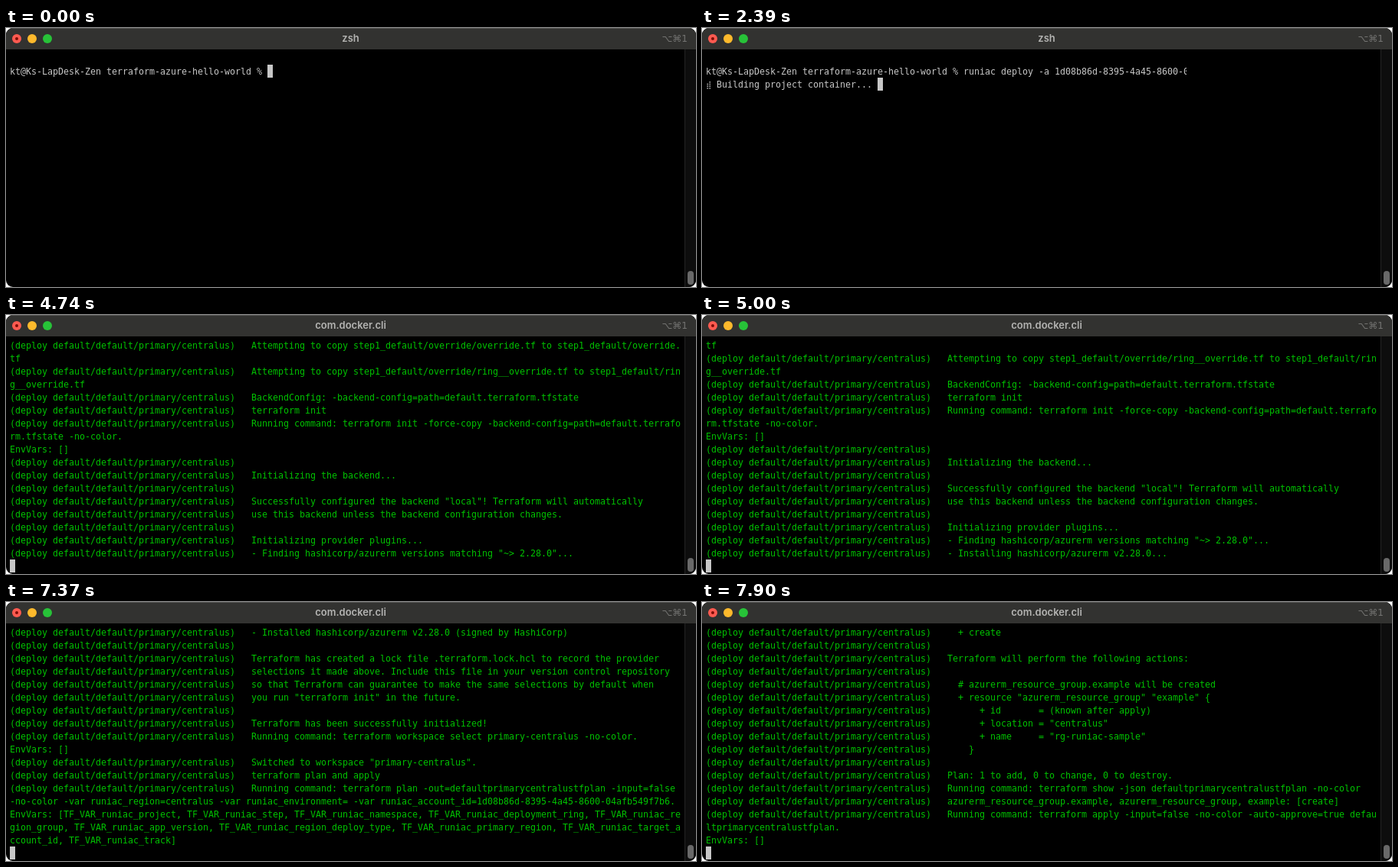
Write an HTML page with a canvas that moves like this. It is 900x339 px and loops after 8 s.

```html
<!DOCTYPE html>
<html lang="en">
<head>
<meta charset="utf-8">
<title>Terminal</title>
<style>
  html, body { margin: 0; width: 100%; height: 100%; overflow: hidden; background: #fff; }
  canvas { display: block; }
</style>
</head>
<body>
<canvas id="stage" width="900" height="339"></canvas>
<script>
const ctx = document.getElementById('stage').getContext('2d');
const LOOP = 8000;
const CELL_W = 7, CELL_H = 17, LEFT = 5, TOP = 31, COLS = 125, ROWS = 17;
const GREY = '#c7c7c7', GREEN = '#00c200';

const ACCOUNT = '1d08b86d-8395-4a45-8600-04afb549f7b6';
const PROMPT = 'kt@Ks-LapDesk-Zen terraform-azure-hello-world % ';
const COMMAND = 'runiac deploy -a ' + ACCOUNT;
const STATUS = '  Building project container... ';

// Lines starting with ">" get the deploy prefix.
const PREFIX = '(deploy default/default/primary/centralus)   ';
const LOG = `>Attempting to copy step1_default/override/override.tf to step1_default/override.tf
>Attempting to copy step1_default/override/ring__override.tf to step1_default/ring__override.tf
>BackendConfig: -backend-config=path=default.terraform.tfstate
>terraform init
>Running command: terraform init -force-copy -backend-config=path=default.terraform.tfstate -no-color.
EnvVars: []
>
>Initializing the backend...
>
>Successfully configured the backend "local"! Terraform will automatically
>use this backend unless the backend configuration changes.
>
>Initializing provider plugins...
>- Finding hashicorp/azurerm versions matching "~> 2.28.0"...
>- Installing hashicorp/azurerm v2.28.0...
>- Installed hashicorp/azurerm v2.28.0 (signed by HashiCorp)
>
>Terraform has created a lock file .terraform.lock.hcl to record the provider
>selections it made above. Include this file in your version control repository
>so that Terraform can guarantee to make the same selections by default when
>you run "terraform init" in the future.
>
>Terraform has been successfully initialized!
>Running command: terraform workspace select primary-centralus -no-color.
EnvVars: []
>Switched to workspace "primary-centralus".
>terraform plan and apply
>Running command: terraform plan -out=defaultprimarycentralustfplan -input=false -no-color -var runiac_region=centralus -var runiac_environment= -var runiac_account_id=${ACCOUNT}.
EnvVars: [TF_VAR_runiac_project, TF_VAR_runiac_step, TF_VAR_runiac_namespace, TF_VAR_runiac_deployment_ring, TF_VAR_runiac_region_group, TF_VAR_runiac_app_version, TF_VAR_runiac_region_deploy_type, TF_VAR_runiac_primary_region, TF_VAR_runiac_target_account_id, TF_VAR_runiac_track]
>
>An execution plan has been generated and is shown below.
>Resource actions are indicated with the following symbols:
>
>  + create
>
>Terraform will perform the following actions:
>
>  # azurerm_resource_group.example will be created
>  + resource "azurerm_resource_group" "example" {
>      + id       = (known after apply)
>      + location = "centralus"
>      + name     = "rg-runiac-sample"
>    }
>
>Plan: 1 to add, 0 to change, 0 to destroy.
>Running command: terraform show -json defaultprimarycentralustfplan -no-color
>azurerm_resource_group.example, azurerm_resource_group, example: [create]
>Running command: terraform apply -input=false -no-color -auto-approve=true defaultprimarycentralustfplan.
EnvVars: []`;

const rows = LOG.split('\n').flatMap(line =>
  line.replace(/^>/, PREFIX).match(new RegExp(`.{1,${COLS}}`, 'g')));

// [start time, value] steps: characters typed, spinner redraws, top log row
const TYPING = [[0, 0], [250, 2], [510, 4], [780, 7], [1050, 11], [1320, 13],
                [1590, 15], [1850, 17], [2120, COMMAND.length]];
const SPINNER = [2390, 2660, 2920, 3180, 3430, 3690, 3960, 4220, 4480].map(t => [t, t]);
const SCROLL = [[4740, 0], [5000, 1], [5260, 18], [7630, 35], [7900, 39]];
const BUILD_START = 2390, DOCKER_START = 2920, LOG_START = 4740;

const valueAt = (steps, t) => steps.filter(([start]) => start <= t).pop()[1];

function rect(x, y, w, h, color) {
  ctx.fillStyle = color;
  ctx.fillRect(x, y, w, h);
}

function pill(x, y, w, h, r, color) {
  ctx.fillStyle = color;
  ctx.beginPath();
  ctx.roundRect(x, y, w, h, r);
  ctx.fill();
}

const dot = (x, y, r, color) => pill(x - r, y - r, 2 * r, 2 * r, r, color);

function write(text, row, color) {
  ctx.font = '11.63px "DejaVu Sans Mono", monospace';
  ctx.textAlign = 'left';
  ctx.fillStyle = color;
  [...text].forEach((ch, col) => {
    if (ch !== ' ') ctx.fillText(ch, LEFT + col * CELL_W, TOP + row * CELL_H + 13);
  });
}

const cursor = (col, row) =>
  rect(LEFT + col * CELL_W, TOP + row * CELL_H, CELL_W, CELL_H, GREY);

// Braille cell with one gap travelling down the left side and up the right.
function spinner(phase) {
  for (let i = 0; i < 8; i++) {
    if (i === phase) continue;
    const right = i > 3;
    rect(right ? 9.5 : 6.5, 70 + 2.7 * (right ? 7 - i : i), 1.6, 1.6, '#b0b0b0');
  }
}

function drawWindow(t) {
  pill(0, 0, 900, 339, 9, '#000');
  ctx.save();
  ctx.clip();
  rect(0, 0, 900, 28, '#323230');
  rect(0, 0, 900, 1, '#555553');
  rect(885, 28, 15, 311, '#0d0d0d');
  rect(885, 28, 1, 311, '#242424');
  ctx.restore();

  pill(889, 318, 8, 18, 4, '#696969');
  dot(14, 14, 6, '#ff5a50');
  dot(14, 14, 2, '#7c0c06');
  dot(34, 14, 6, '#fdb92c');
  dot(54, 14, 6, '#27c238');

  ctx.font = '600 13px Inter, sans-serif';
  ctx.textAlign = 'center';
  ctx.fillStyle = '#b4b4b2';
  ctx.fillText(t < DOCKER_START ? 'zsh' : 'com.docker.cli', 449.5, 18);
  ctx.font = '12px "DejaVu Sans", sans-serif';
  ctx.textAlign = 'right';
  ctx.fillStyle = '#747472';
  ctx.fillText('⌥⌘1', 889, 18);
}

function drawPrompt(t) {
  const typed = valueAt(TYPING, t);
  write(PROMPT + COMMAND.slice(0, typed), 1, GREY);
  const hiddenFrom = t < 2660 ? 632 : 628;
  rect(hiddenFrom, 48, 712 - hiddenFrom, CELL_H, '#000');
  if (t < BUILD_START) return cursor(PROMPT.length + typed, 1);

  spinner(Math.floor((valueAt(SPINNER, t) - BUILD_START) / 100) % 8);
  write(STATUS, 2, GREY);
  cursor(STATUS.length, 2);
}

function drawLog(t) {
  const top = valueAt(SCROLL, t);
  rows.slice(top, top + ROWS).forEach((line, row) => write(line, row, GREEN));
  cursor(0, ROWS);
}

function frame(now) {
  const t = now % LOOP;
  ctx.clearRect(0, 0, 900, 339);
  drawWindow(t);
  (t < LOG_START ? drawPrompt : drawLog)(t);
  requestAnimationFrame(frame);
}
requestAnimationFrame(frame);
</script>
</body>
</html>
```
